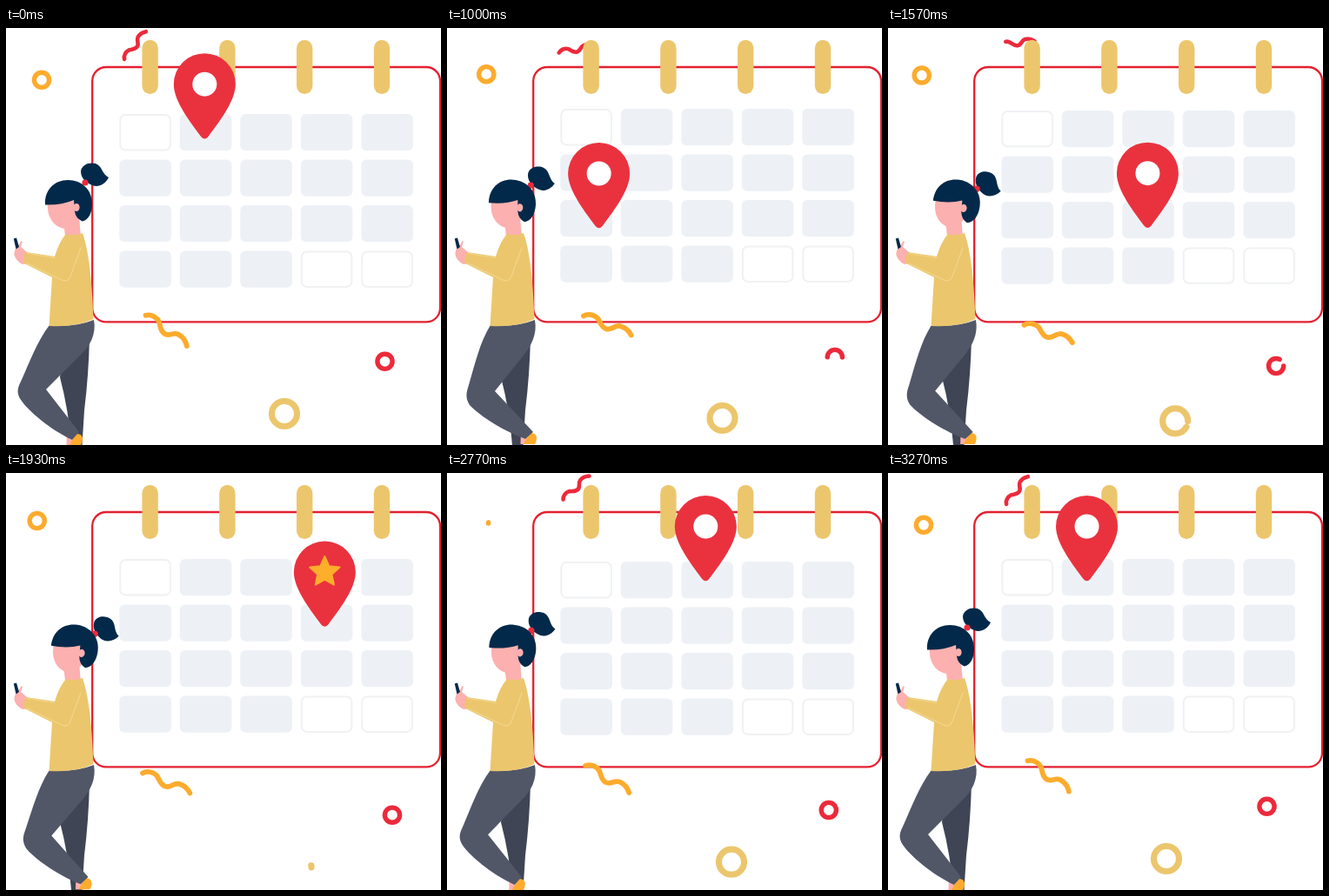
An HTML page that plays this animation: 500 px wide and 480 px high, repeating every 6910 ms.

```html
<!DOCTYPE html>
<html lang="en">
<head>
<meta charset="utf-8">
<title>Calendar</title>
<style>
  html, body { margin: 0; width: 100%; height: 100%; overflow: hidden; background: #fff; }
  svg { display: block; width: 100vw; height: 100vh; }
  .line { fill: none; stroke-linecap: round; stroke-linejoin: round; }
  .red { stroke: #ec2a3b; }
  .orange { stroke: #fdab2d; }
  .gold { stroke: #ecc66d; }
  .skin { fill: #fcb0af; }
  .hair { fill: #03294a; }
  .shirt { fill: #ebc66c; }
  .crease { fill: none; stroke: #f3d68c; stroke-width: 1.2; stroke-linecap: round; }
</style>
</head>
<body>
<svg viewBox="0 0 500 480">
  <rect x="99.2" y="45" width="399.8" height="293.4" rx="16" fill="#fff" stroke="#e3202f" stroke-width="2.3"/>
  <path id="redWave" class="line red" stroke-width="4.6"/>
  <g id="cells"></g>
  <g id="posts" fill="#ecc66d"></g>

  <circle id="orangeRing" class="line orange" r="8.6" stroke-width="5.4"/>
  <circle id="redRing" class="line red" r="8.6" stroke-width="5.4"/>
  <circle id="goldRing" class="line gold" r="14.5" stroke-width="7.2"/>
  <path id="orangeWave" class="line orange" stroke-width="5.8"/>

  <path fill="#3f4554" d="M70 350L96 356Q95 400 90 440L87.500 480H75Q72 440 62 402Z"/>
  <g id="foot">
    <path class="skin" d="M70 462L82 464L80 480H69.500Z"/>
    <path fill="#fdab2d" d="M81 467Q88 467 88 473Q88 477 86 480H73Q76 474 81 467Z"/>
  </g>
  <path id="leg" fill="#515767"/>

  <path class="skin" d="M66 222L84 218L86 240Q76 246 68 239Z"/>
  <path class="skin" d="M24 258L17 252L19 246Q17 244 16 248L13 252Q9 256 9.500 261Q11 268 19 272L25 271Z"/>
  <path class="hair" d="M8.800 242.500L12 241.500L15 252L11.500 254.500Z"/>
  <path class="shirt" d="M69 237Q78 240 88 236C95 256 99 290 100.500 335Q80 345 49.500 343L53 287L21 271Q19 264 23 258L56 263Q61 246 69 237Z"/>
  <path class="crease" d="M25 259.500L56 264.500M24 271L64 290Q71 293 74 286L86 253"/>

  <g id="head">
    <g id="tail">
      <path class="hair" d="M86 165C87 157 96 154 103 156C111 159 110 168 118 172C114 180 106 184 99 181C92 178 86 173 86 165Z"/>
      <circle cx="91" cy="178" r="3.600" fill="#ec2a3b"/>
    </g>
    <path class="skin" d="M48 200C46 218 56 231 70 231Q80 229 85 215L82 194H50Z"/>
    <path class="hair" d="M45 203.500C44 186 56 175 71 175C88 175 99 187 99 202C99 213 95 221 87.500 222.500Q80 219 79 211L78 198Q64 204 45 203.500Z"/>
    <ellipse class="skin" cx="81" cy="206.500" rx="3.600" ry="4.600"/>
  </g>

  <g id="pin">
    <path fill="#ea323f" d="M-35.500 -62.500A35.500 35.500 0 0 1 35.500 -62.500C35.500 -42 14 -16 4 -2Q0 2.500 -4 -2C-14 -16 -35.500 -42 -35.500 -62.500Z"/>
    <circle id="hole" cy="-62.500" fill="#fff"/>
    <path id="star" fill="#fdae2a" stroke="#fdae2a" stroke-width="2" stroke-linejoin="round"/>
  </g>
</svg>
<script>
const LOOP = 6910, MOVE = 3270;
const $ = id => document.getElementById(id);
const set = (id, attrs) => { for (const k in attrs) $(id).setAttribute(k, attrs[k]); };
const clamp = p => Math.min(1, Math.max(0, p));
const ramp = (t, a, b) => clamp((t - a) / (b - a));
const ease = (p, n) => p < .5 ? (2 * p) ** n / 2 : 1 - (2 - 2 * p) ** n / 2;

function add(parent, tag, attrs) {
  const el = document.createElementNS('http://www.w3.org/2000/svg', tag);
  for (const k in attrs) el.setAttribute(k, attrs[k]);
  $(parent).append(el);
}

// Static parts
for (let i = 0; i < 20; i++) {
  const x = 130.3 + i % 5 * 69.5, y = Math.floor(i / 5) * 52.5;
  const open = i === 0 || i > 17;
  add('cells', 'rect', open
    ? { x: x + 1, y: y + 1, width: 57.6, height: 40.4, rx: 6, fill: '#fff', stroke: '#f0f1f3', 'stroke-width': 2 }
    : { x, y, width: 59.6, height: 42.2, rx: 6, fill: '#edf1f6' });
}
for (let i = 0; i < 4; i++)
  add('posts', 'rect', { x: 156.4 + i * 88.8, y: 13.8, width: 18.4, height: 62.2, rx: 9.2 });

const wave = s => 'M' + [-29.5, 0, -26, -5, -18, -6, -13, -3.5, -8, 0, -6, 4, 0, 4, 7, 4, 7, -4, 14, -5, 21, -6, 25, -4, 29.5, 0]
  .map((v, i) => (i === 2 ? 'C' : '') + (v * s).toFixed(1)).join(' ');
set('orangeWave', { d: wave(1) });
set('redWave', { d: wave(.68) });

const points = Array.from({ length: 10 }, (_, i) => {
  const a = (i / 5 - .5) * Math.PI, r = i % 2 ? 8.5 : 18;
  return `${r * Math.cos(a)} ${r * Math.sin(a)}`;
});
set('star', { d: 'M' + points.join('L') + 'Z' });

// Smooth tracks through values at shared key times, without overshoot
const KEYS = [0, 470, 1000, 1270, 1930, 2770, 3270];
function track(...v) {
  const n = KEYS.length;
  const slope = i => (v[i + 1] - v[i]) / (KEYS[i + 1] - KEYS[i]);
  const tangent = i => {
    const a = slope(i > 0 ? i - 1 : n - 2), b = slope(i < n - 1 ? i : 0);
    return a * b > 0 ? 2 * a * b / (a + b) : 0;
  };
  return t => {
    let i = 0;
    while (i < n - 2 && t > KEYS[i + 1]) i++;
    const d = KEYS[i + 1] - KEYS[i], p = (t - KEYS[i]) / d, q = 1 - p;
    return v[i] * q * q * (1 + 2 * p) + v[i + 1] * p * p * (3 - 2 * p)
      + d * p * q * (q * tangent(i) - p * tangent(i + 1));
  };
}

const cellY = track(99, 96, 93, 92.5, 99, 102, 99);
const nod = track(0, 0, .45, 1, 1, .5, 0);
const swing = track(0, .65, 1, 1, .7, .12, 0);
const still = x => () => x;

// Drifting pieces: position, angle, and the moment the stroke is fully erased
const pieces = [
  { id: 'orangeRing', gone: 2780,
    x: track(41, 45, 45.3, 42.7, 35.7, 39, 41), y: track(59.8, 54.6, 53.2, 54, 55, 58, 59.8), a: still(0) },
  { id: 'redRing', gone: 1200,
    x: track(435.5, 443.5, 445.8, 447, 444, 438.8, 435.5), y: track(383.8, 379, 379, 383, 393.7, 388, 383.8), a: still(0) },
  { id: 'goldRing', gone: 1940,
    x: track(320, 315.8, 316.5, 322, 336.5, 327, 320), y: track(444, 447.8, 449, 450.5, 453.8, 447.7, 444), a: still(0) },
  { id: 'orangeWave', gone: 480,
    x: still(184.2), y: track(348.5, 343, 342.5, 346, 357, 352.5, 349), a: track(36.7, 29, 22, 19, 23, 32, 36.7) },
  { id: 'redWave', gone: 1900,
    x: still(148.5), y: track(20, 25, 25, 22, 14, 17, 20), a: track(-52, -35, -10, -4, -14, -42, -52) }
];
for (const p of pieces) set(p.id, { pathLength: 1 });

function trim(id, t, gone) {
  const redraw = t > gone + 20;
  const from = redraw ? 0 : ramp(t, gone - 400, gone);
  const len = redraw ? ramp(t, gone + 40, gone + 440) : 1 - from;
  set(id, {
    visibility: len > .003 ? 'visible' : 'hidden',
    'stroke-dasharray': len === 1 ? 'none' : `${len} 2`,
    'stroke-dashoffset': -from
  });
}

// Pin stops and the middle time of each hop
const STOPS = [[228.3, 124], [159, 230], [298, 230], [367, 176], [297.3, 124], [228.3, 124]];
const HOPS = [455, 1095, 1755, 2415, 3075];
function pinAt(t) {
  let [x, y] = STOPS[0];
  HOPS.forEach((mid, i) => {
    const p = ease(ramp(t, mid - 240, mid + 240), 3);
    const py = i ? p : ease(ramp(t, -100, 730), 2);
    x += (STOPS[i + 1][0] - STOPS[i][0]) * p;
    y += (STOPS[i + 1][1] - STOPS[i][1]) * py;
  });
  return [x, y];
}

function drawLeg(k) {
  const at = (x, y, dx, dy) => `${x + dx * k} ${y + dy * k}`;
  set('leg', { d: `M50 342Q78 345 101 336C104 352 97 366 ${at(85, 377, 2, 1)}`
    + `L${at(46, 416, 9, 2)}L${at(84, 465, 15, 0)}L${at(76, 474, 14, -1)}`
    + `C${at(50, 462, 10, 0)} ${at(25, 440, 9, 3)} ${at(17, 428, 9, 6)}`
    + `C${at(12, 420, 9, 6)} ${at(13, 415, 9, 5)} ${at(17, 407, 8, 4)}`
    + `C${at(27, 385, 5, 2)} ${at(36, 360, 2, 1)} 50 342Z` });
  set('foot', { transform: `translate(${15 * k} ${-k})` });
}

function draw(t) {
  set('cells', { transform: `translate(0 ${cellY(t)})` });
  for (const p of pieces) {
    set(p.id, { transform: `translate(${p.x(t)} ${p.y(t)}) rotate(${p.a(t)})` });
    trim(p.id, t, p.gone);
  }
  const h = nod(t);
  set('head', { transform: `rotate(${9 * h} 78 245)` });
  set('tail', { transform: `translate(${1.5 * h} ${4 * h}) rotate(${9 * h} 90 178)` });
  drawLeg(swing(t));

  const star = ease(ramp(t, 1660, 1880), 2) * (1 - ease(ramp(t, 2300, 2520), 2));
  set('pin', { transform: `translate(${pinAt(t).join(' ')})` });
  set('hole', { r: 14 * (1 - star) });
  set('star', { transform: `translate(0 -62.5) scale(${star})`, visibility: star > 0 ? 'visible' : 'hidden' });
}

const start = performance.now();
function tick() {
  draw(Math.min((performance.now() - start) % LOOP, MOVE));
  requestAnimationFrame(tick);
}
tick();
</script>
</body>
</html>
```
